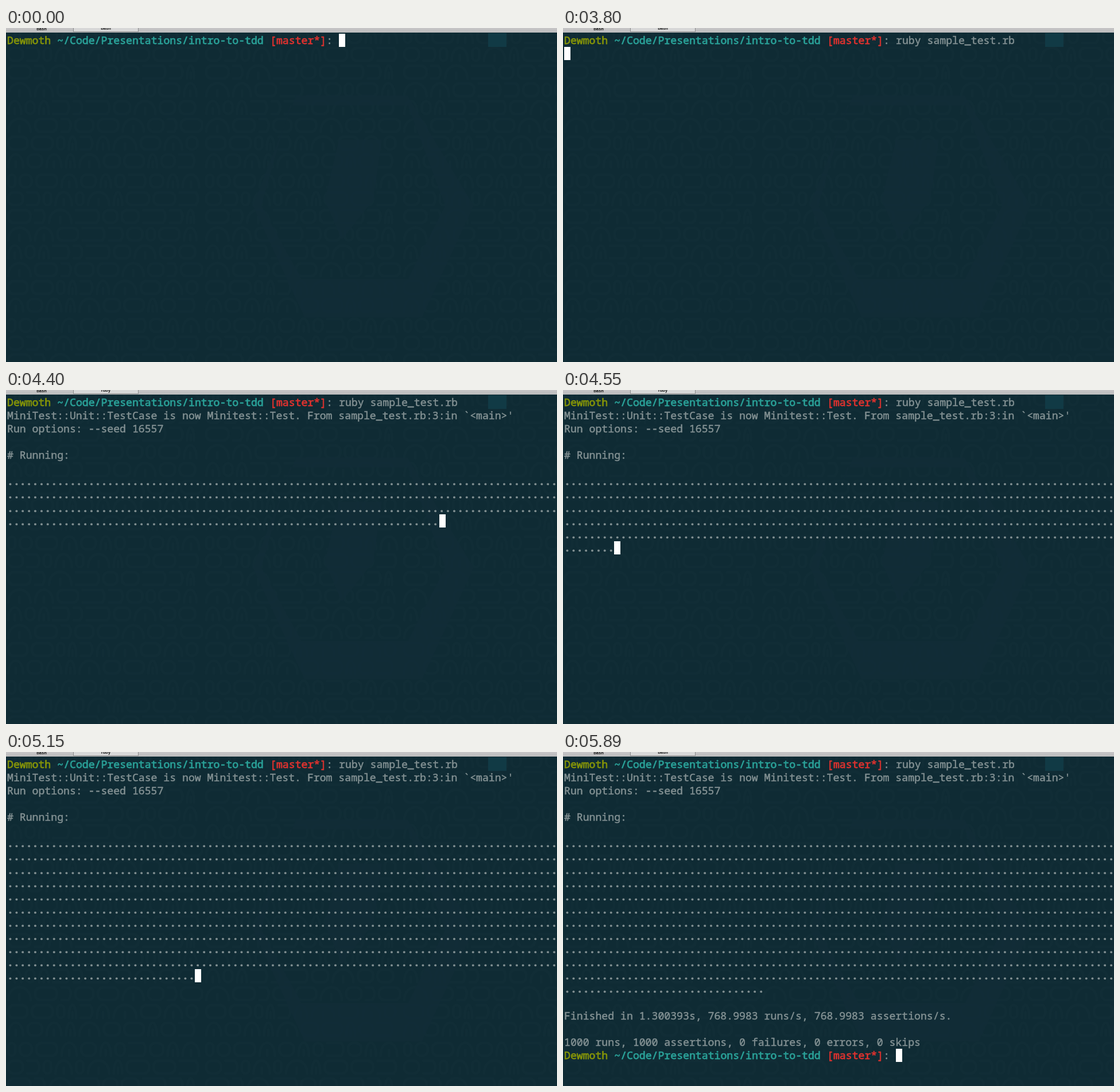
Write an HTML page with a canvas that moves like this. It is 960 px wide and 583 px high and loops after 8 s.

```html
<!DOCTYPE html>
<html lang="en">
<head>
<meta charset="utf-8">
<title>Test run</title>
<style>
  html, body { margin: 0; width: 100%; height: 100%; overflow: hidden; background: #0f2b35; }
  canvas { display: block; }
</style>
</head>
<body>
<canvas id="stage" width="960" height="583"></canvas>
<script>
const W = 960, H = 583, LOOP = 8000;
const CELL = 10.906, ROW = 23.09, LEFT = 2, TOP = 9.6, COLS = 88;
const GREY = '#839193', OLIVE = '#859408', TEAL = '#2aa198', RED = '#dc322f';
const ctx = document.getElementById('stage').getContext('2d');

function makeCanvas(width, height) {
  const c = document.createElement('canvas');
  c.width = width;
  c.height = height;
  return c;
}

function addPolygon(g, points) {
  points.forEach(([x, y], i) => i ? g.lineTo(x, y) : g.moveTo(x, y));
  g.closePath();
}

// Faint carved wallpaper that repeats every 345 by 252 pixels
function makeTile() {
  const tile = makeCanvas(345, 252), g = tile.getContext('2d');
  let seed = 11;
  const rand = () => (seed = seed * 16807 % 2147483647) / 2147483647;
  g.fillStyle = '#0f2b34';
  g.fillRect(0, 0, 345, 252);
  g.strokeStyle = '#112d36';
  g.lineWidth = 5;
  g.lineCap = 'round';
  for (let y = 4; y < 245; y += 31) {
    for (let x = 4; x < 330;) {
      const w = 20 + rand() * 28, kind = rand();
      g.beginPath();
      if (kind < 0.45) {
        g.roundRect(x, y, w - 8, 22, 9);
      } else if (kind < 0.75) {
        g.moveTo(x, y + 22);
        g.bezierCurveTo(x, y - 8, x + w - 8, y - 8, x + w - 8, y + 22);
        g.moveTo(x + w / 2 - 4, y + 12);
        g.lineTo(x + w / 2 - 4, y + 22);
      } else {
        g.moveTo(x, y);
        g.lineTo(x + w - 12, y);
        g.quadraticCurveTo(x + w - 4, y + 11, x + w - 12, y + 22);
        g.lineTo(x, y + 22);
      }
      g.stroke();
      x += w;
    }
  }
  return tile;
}

function makeBackground() {
  const c = makeCanvas(W, H), g = c.getContext('2d');
  g.fillStyle = g.createPattern(makeTile(), 'repeat');
  g.fillRect(0, 0, W, H);

  g.fillStyle = 'rgba(18, 45, 55, .75)';
  g.beginPath();
  addPolygon(g, [[505, 118], [700, 118], [815, 310], [725, 505], [520, 505], [430, 310]]);
  addPolygon(g, [[495, 135], [700, 135], [765, 310], [700, 438], [515, 438], [445, 310]]);
  addPolygon(g, [[580, 195], [655, 195], [640, 300], [585, 370], [555, 300]]);
  g.fill('evenodd');

  g.fillStyle = '#113a45';
  g.fillRect(840, 9, 32, 24);

  const bar = g.createLinearGradient(0, 0, 0, 8);
  bar.addColorStop(0, '#c6c5c6');
  bar.addColorStop(1, '#bcbcbd');
  g.fillStyle = bar;
  g.fillRect(0, 0, W, 8);
  g.fillStyle = '#8a8a8b';
  g.fillRect(117, 0, 114, 7);
  g.fillStyle = '#d8d8d8';
  g.fillRect(118, 0, 112, 6);
  return c;
}

// A thin outline gives the letters their medium weight
function write(text, row, col = 0, color = GREY, outline = 0.5, weight = 400) {
  const x = LEFT + col * CELL, y = TOP + row * ROW + 18.2;
  ctx.font = `${weight} 18.177px "Noto Sans Mono", "DejaVu Sans Mono", monospace`;
  ctx.fillStyle = ctx.strokeStyle = color;
  ctx.lineWidth = outline;
  ctx.lineJoin = 'round';
  ctx.fillText(text, x, y);
  ctx.strokeText(text, x, y);
}

function prompt(row) {
  write('Dewmoth', row, 0, OLIVE, 0.75);
  write('~/Code/Presentations/intro-to-tdd', row, 8, TEAL, 0.75);
  write('[master*]', row, 42, RED, 0.75);
  write(':', row, 51);
}

function cursor(row, col) {
  ctx.fillStyle = '#fff';
  const y = Math.round(TOP + row * ROW);
  ctx.fillRect(Math.round(LEFT + col * CELL), y, 11, 23);
}

function tabTitle(text, x, y) {
  ctx.font = 'bold 7.5px "Liberation Sans", Arial, sans-serif';
  ctx.fillStyle = '#111';
  ctx.textAlign = 'center';
  ctx.fillText(text, x, y);
  ctx.textAlign = 'left';
}

function testDots(count) {
  for (let i = 0; i < count; i += COLS) {
    write('.'.repeat(Math.min(COLS, count - i)), 6 + i / COLS, 0, GREY, 0.6, 700);
  }
}

const background = makeBackground();

function draw(t) {
  ctx.drawImage(background, 0, 0);
  tabTitle('bash', 62, 4);
  tabTitle(t >= 4400 && t < 5890 ? 'ruby' : 'bash', 174, 3.4);

  prompt(0);
  if (t < 1500) return cursor(0, 53);
  write('ruby sample_test.rb', 0, 53);
  if (t < 3800) return cursor(0, 73);
  if (t < 3950) return cursor(1, 0);
  write("MiniTest::Unit::TestCase is now Minitest::Test. From sample_test.rb:3:in `<main>'", 1);
  if (t < 4100) return cursor(2, 0);
  write('Run options: --seed 16557', 2);
  write('# Running:', 4);

  // The screen refreshes every 150 ms while the tests run
  const step = Math.floor((t - 4100) / 150);
  const count = t < 5300 ? Math.floor(102.6 + step * 115.4) : 1000;
  testDots(count);
  if (t < 5300) return cursor(6 + Math.floor(count / COLS), count % COLS);

  write('Finished in 1.300393s, 768.9983 runs/s, 768.9983 assertions/s.', 19);
  write('1000 runs, 1000 assertions, 0 failures, 0 errors, 0 skips', 21);
  prompt(22);
  cursor(22, 53);
}

const start = performance.now();
function tick() {
  draw((performance.now() - start) % LOOP);
  requestAnimationFrame(tick);
}
tick();
</script>
</body>
</html>
```
